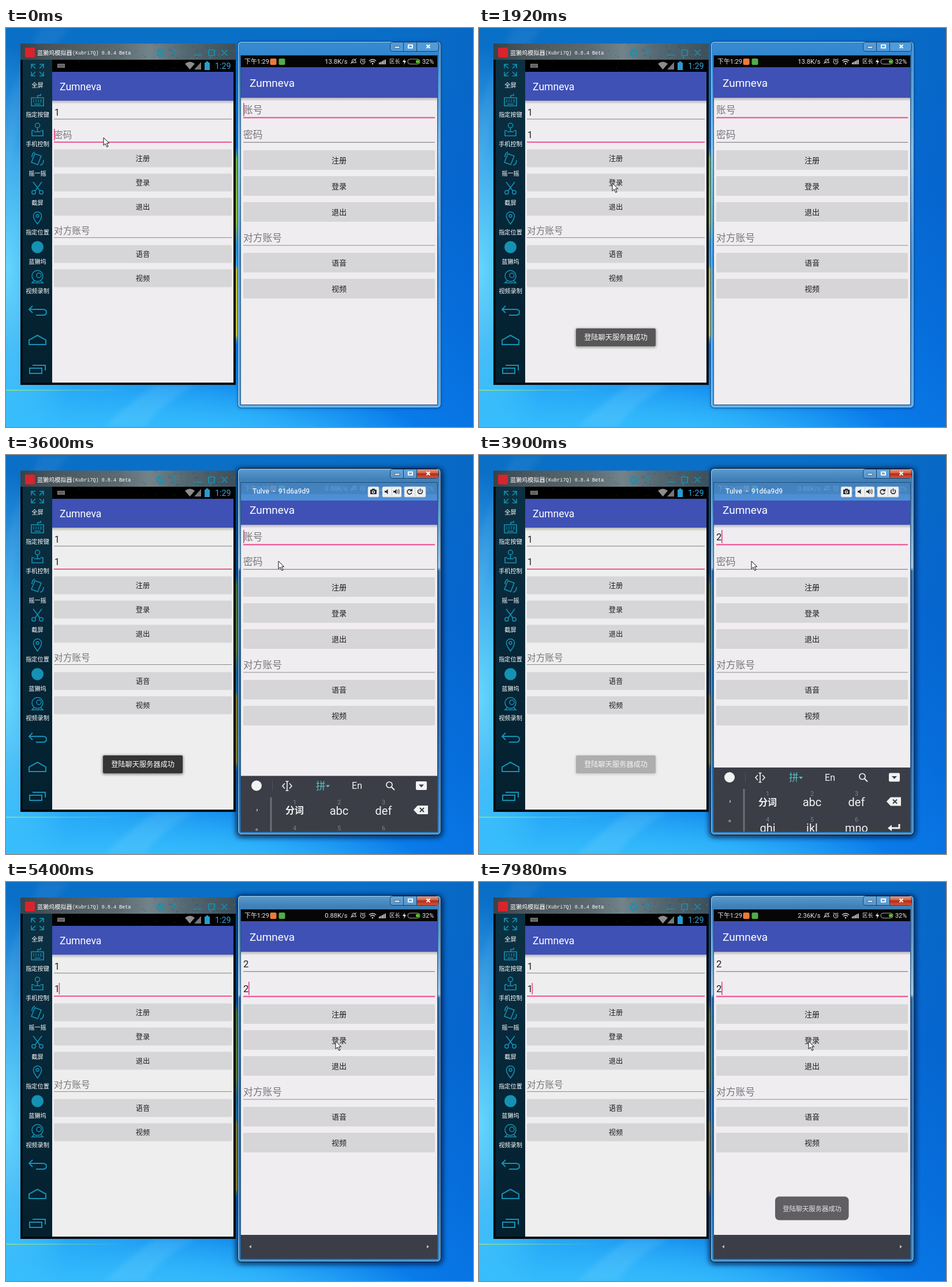
These frames come from a looping animation (809 px wide and 692 px high, 8 s). An HTML page:

```html
<!DOCTYPE html>
<html lang="zh">
<head>
<meta charset="utf-8">
<title>Two devices signing in</title>
<style>
html, body { margin: 0; width: 100%; height: 100%; overflow: hidden; background: #0a74d6; }
svg { display: block; width: 100%; height: 100%; }
text { font-family: Roboto, "Noto Sans CJK SC", "Noto Sans CJK", sans-serif; white-space: pre; }
.mono { font-family: "Liberation Mono", monospace; }
</style>
</head>
<body>
<svg id="stage" viewBox="0 0 809 692" xmlns="http://www.w3.org/2000/svg"></svg>
<script>
const LOOP = 8000, PINK = '#f0468a', TEAL = '#1591b4', INK = '#1c1c1e', HINT = '#78767a';
const APP = 'Zumneva', TOAST = '登陆聊天服务器成功';

// ---- markup helpers ----
const rect = (x, y, w, h, fill, more = '') =>
  `<rect x="${x}" y="${y}" width="${w}" height="${h}" fill="${fill}" ${more}/>`;
const path = (d, stroke, width = 1.5, more = '') =>
  `<path d="${d}" fill="none" stroke="${stroke}" stroke-width="${width}" ${more}/>`;
const fill = (d, color, more = '') => `<path d="${d}" fill="${color}" ${more}/>`;
const disc = (x, y, r, color) => `<circle cx="${x}" cy="${y}" r="${r}" fill="${color}"/>`;
const ring = (x, y, r, color, w = 1.5, more = '') =>
  `<circle cx="${x}" cy="${y}" r="${r}" fill="none" stroke="${color}" stroke-width="${w}" ${more}/>`;
const text = (s, x, cy, size, color, anchor = 'start', more = '') =>
  `<text x="${x}" y="${cy + size * 0.365}" font-size="${size}" fill="${color}" text-anchor="${anchor}" ${more}>${s}</text>`;
const mid = (s, x, cy, size, color, more) => text(s, x, cy, size, color, 'middle', more);
const group = (id, body) => `<g id="${id}">${body}</g>`;
const stops = list => list.map(([o, c, a = 1]) =>
  `<stop offset="${o}" stop-color="${c}" stop-opacity="${a}"/>`).join('');
const linear = (id, x2, y2, list) =>
  `<linearGradient id="${id}" x1="0" y1="0" x2="${x2}" y2="${y2}">${stops(list)}</linearGradient>`;
const radial = (id, color, alpha) =>
  `<radialGradient id="${id}">${stops([[0, color, alpha], [.5, color, alpha * .6], [1, color, 0]])}</radialGradient>`;
const glow = (x, y, rx, ry, id) => `<ellipse cx="${x}" cy="${y}" rx="${rx}" ry="${ry}" fill="url(#${id})"/>`;

let seed = 7;
const rnd = () => (seed = seed * 16807 % 2147483647) / 2147483647;
const specks = (n, x, y, w, h, color) => Array.from({ length: n }, () =>
  rect((x + rnd() * w).toFixed(1), (y + rnd() * h).toFixed(1), 1 + rnd() * 2 | 0, 1, color,
    `opacity="${(.1 + rnd() * .35).toFixed(2)}"`)).join('');

const defs = `<defs>
${linear('sky', 0, 1, [[0, '#0a70c6'], [.4, '#086cd4'], [.75, '#0876e2'], [1, '#0a80ee']])}
${linear('dusk', 1, 0, [[0, '#0050c0', 0], [.7, '#0050c0', .08], [1, '#0050c0', .25]])}
${radial('cyan', '#6adcff', .95)}${radial('azure', '#3cc6ff', .95)}
${linear('line', 1, 0, [[0, '#9fe87a', .9], [1, '#9fe87a', 0]])}
${linear('flag', 0, 1, [[0, '#3fa9d8', 0], [.06, '#6fbf4a'], [.38, '#9ccc3c'], [.5, '#2f9be0'],
  [.6, '#35b4f0'], [.62, '#c8c83c'], [.95, '#d8cf3a'], [1, '#3fa9d8', 0]])}
${linear('topbar', 1, 0, [[0, '#37434a'], [.15, '#4a565c'], [.45, '#5c6a70'], [.6, '#72838a'], [.75, '#566a74'], [1, '#3c505b']])}
${linear('side', 0, 1, [[0, '#0c3142'], [.4, '#07283a'], [1, '#04202e']])}
${linear('drop', 0, 1, [[0, '#000', .24], [1, '#000', 0]])}
${linear('idle', 0, 1, [[0, '#3e93d8'], [.04, '#3a8fd8'], [.3, '#8fcdf2'], [.6, '#3f94e4'], [1, '#5fb4f4']])}
${linear('live', 0, 1, [[0, '#6aaee0'], [.03, '#4a90cc'], [.1, '#5a9fd6'], [.27, '#b4def4'], [.28, '#2a6fb4'], [.7, '#2468b2'], [1, '#3f96da']])}
${linear('red', 0, 1, [[0, '#e09a88'], [.45, '#cf5a44'], [.5, '#b42a14'], [1, '#d4573c']])}
${linear('bar', 0, 1, [[0, '#4a92d6'], [1, '#5298da']])}
<filter id="blur" x="-20%" y="-20%" width="140%" height="140%"><feGaussianBlur stdDeviation="5"/></filter>
<filter id="soft" x="-20%" y="-60%" width="140%" height="220%"><feGaussianBlur stdDeviation="2"/></filter>
<clipPath id="phone"><rect x="407" y="48" width="340" height="605"/></clipPath>
</defs>`;

const wallpaper = rect(0, 0, 809, 692, 'url(#sky)') + rect(400, 0, 409, 692, 'url(#dusk)')
  + glow(0, 420, 130, 390, 'cyan') + glow(90, 720, 420, 210, 'azure') + glow(400, 730, 330, 120, 'azure')
  + fill('M0 150Q14 90 60 0H110Q30 90 0 260Z', '#fff', 'opacity=".05" filter="url(#blur)"')
  + fill('M170 692Q215 650 260 618H330Q270 650 240 692Z', '#bdf0ff', 'opacity=".12" filter="url(#blur)"')
  + rect(0, 627.5, 210, 1.5, 'url(#line)') + rect(397, 205, 9, 345, 'url(#flag)');

// ---- form shared by both devices ----
const button = (x, y, w, h, label, size) =>
  rect(x, y, w, h, '#d6d5d8', 'rx="2"') + mid(label, x + w / 2, y + h / 2 + .5, size, INK);

function form(p) {
  const labels = ['注册', '登录', '退出', '语音', '视频'];
  return rect(p.left, p.top, p.width, p.barH, '#3f51b5')
    + rect(p.left, p.top + p.barH, p.width, 6, 'url(#drop)')
    + text(APP, p.titleX, p.titleY, p.titleSize, '#fff')
    + p.rows.map((y, i) => button(p.x, y, p.w, p.h, labels[i], p.size)).join('')
    + text('对方账号', p.x, p.peerY, p.hint, HINT)
    + rect(p.x, p.peerLine, p.w, 1, '#8b898d');
}

// ---- left emulator ----
function sideIcons() {
  const s = d => path(d, TEAL, 1.6);
  return s('M44 70V63h7M44 63l7 7M58 63h7v7M65 63l-7 7M44 76v7h7M44 83l7-7M65 76v7h-7M65 83l-7-7')
    + s('M44 121h21v14H44zM55 121v-4h5v-3M47 125h2M51 125h2M55 125h2M59 125h3M47 128h2M51 128h2M55 128h2M59 128h3M49 132h11')
    + ring(54.5, 169, 4, TEAL) + s('M54.5 173v7M49 178h-4v9h19v-9h-4M49 180h11')
    + s('M50 218l11 4-6 15-11-4zM45 224q0-7 5-9M65 229q0 8-6 9')
    + s('M47 267l12 16M62 267l-12 16') + ring(48, 285, 3.2, TEAL) + ring(61, 285, 3.2, TEAL)
    + s('M54.5 340q-7-9-7-14a7 7 0 0 1 14 0q0 5-7 14z') + ring(54.5, 326, 2.4, TEAL)
    + disc(54.5, 380, 10.5, TEAL)
    + ring(54.5, 430, 9.5, TEAL) + ring(57, 429, 4, TEAL) + s('M49 438l-4 4h19l-4-4')
    + path('M46 482l-6 6 6 6M40 488h24q6 0 6 5t-6 5H52', TEAL, 2)
    + path('M40 549v-8l14.5-8 14.5 8v8z', TEAL, 2)
    + path('M41 590h21v9H41zM46 585h22v9', TEAL, 2);
}

function emulator() {
  const names = ['全屏', '指定按键', '手机控制', '摇一摇', '截屏', '指定位置', '蓝獭坞', '视频录制'];
  return rect(25, 27, 373, 592, '#05090c')
    + rect(25, 27, 373, 28, 'url(#topbar)') + specks(60, 26, 28, 370, 26, '#9fb4bd') + specks(60, 26, 28, 370, 26, '#0c1a22')
    + rect(33, 34, 17, 17, '#d8242c', 'rx="2"')
    + text('蓝獭坞模拟器', 54, 43, 10.1, '#fff')
    + text('(Kubri7Q) 0.8.4 Beta', 115, 43, 8.45, '#fff', 'start', 'class="mono" xml:space="preserve"')
    + ring(268, 43, 5, TEAL, 2) + ring(268, 43, 7, TEAL, 1.5, 'stroke-dasharray="2.7 2.8"') + disc(268, 43, 1.5, TEAL)
    + mid('?', 291.5, 43, 15, TEAL, 'font-weight="700"')
    + path('M325 47h14M351 38h10v10h-10zM373.5 38l10 10M383.5 38l-10 10', TEAL, 1.7)
    + rect(29, 55, 51, 560, 'url(#side)') + specks(80, 30, 56, 48, 555, '#1b4c5e')
    + sideIcons() + names.map((n, i) => mid(n, 54.5, 99 + i * 51.1, 10.2, '#fff')).join('')
    + group('leftBg', rect(80, 55, 314, 560, '#efedf0'))
    + rect(80, 55, 314, 21, '#000') + specks(30, 110, 56, 190, 19, '#3c4046')
    + rect(89, 62, 13, 7, '#777') + path('M91 64.5h9M92 67h7', '#111', 1, 'stroke-dasharray="1 1"')
    + fill('M310 62q8.5-7 17 0L318.5 72z', '#8c8c8c') + fill('M338 59v13h-12z', '#777')
    + rect(344, 60, 9, 13, '#2a9bd0') + rect(346.5, 58, 4, 2, '#2a9bd0')
    + text('1:29', 362, 66, 14.3, '#33a5dc')
    + form({ left: 80, top: 76, width: 314, barH: 50, titleX: 93, titleY: 102, titleSize: 17.6,
        x: 83, w: 308, h: 31, size: 12.2, rows: [210.5, 252.5, 294.5, 376.5, 418.5], hint: 15.7, peerY: 351, peerLine: 363 })
    + text('1', 84, 146, 15.7, INK) + rect(83, 157.5, 308, 1, '#7f7d81')
    + group('leftHint', text('密码', 83, 185.5, 15.7, HINT)) + group('leftPass', text('1', 84, 185.5, 15.7, INK))
    + rect(83, 197, 308, 1.8, PINK)
    + `<rect id="leftCaret" y="175" width="1.6" height="20" fill="${PINK}"/>`
    + group('leftToast', rect(167, 521, 140, 33, '#000', 'rx="3" opacity=".45" filter="url(#soft)"')
      + rect(168, 521, 138, 31, '#343434', 'rx="2"') + mid(TOAST, 237, 537, 12.2, '#fff'));
}

// ---- right phone window ----
const shell = (paint, edge, close) => rect(401.5, 23.5, 351.5, 635, `url(#${paint})`, `rx="6" stroke="${edge}" fill-opacity=".86"`)
  + rect(402.5, 24.5, 349.5, 633, 'none', 'rx="5" stroke="#d4efff" stroke-opacity=".7"')
  + rect(406.5, 47.5, 341, 606, 'none', 'stroke="#1c4a78"')
  + rect(665.5, 24.5, 84, 16, '#6fb2e6', `fill-opacity=".45" rx="4" stroke="#17406c"`) + close
  + path('M688.5 25v15M711.5 25v15', '#17406c', 1)
  + rect(673, 32, 9, 3, '#fff', 'stroke="#3a4a5c" stroke-width=".8"')
  + rect(697, 29.5, 7, 5, 'none', 'stroke="#fff" stroke-width="2"')
  + path('M728.5 29l6 6M734.5 29l-6 6', '#fff', 2);

const status = () => rect(407, 48, 340, 20, '#050505')
  + text('下午1:29', 413, 58, 10.9, '#e8e8e8')
  + rect(457.5, 53, 11, 11, '#ee7a35', 'rx="2"') + rect(472.5, 53, 11, 11, '#4fae48', 'rx="2"')
  + `<text id="speed" x="591.5" y="62" font-size="11.2" fill="#e8e8e8" text-anchor="end"></text>`
  + path('M598 60q2-1 2-5 2-2 5 0 0 4 2 5zM597 62l10-9', '#ddd', 1)
  + ring(618, 58.5, 3.8, '#ddd', 1.1) + path('M618 56v3h2M613.5 55l2-2M622.5 55l-2-2', '#ddd', 1)
  + path('M629 57q6-5 12 0M631 59.5q4-3.5 8 0', '#ddd', 1.4) + disc(635, 62, 1.3, '#ddd')
  + [0, 1, 2, 3, 4].map(i => rect(646 + i * 2.5, 60 - i * 1.3, 1.7, 3 + i * 1.3, '#ddd')).join('')
  + text('区长', 664, 58, 9.4, '#e8e8e8')
  + fill('M691 53l-4 6h3l-1 5 4-7h-3z', '#eee')
  + rect(696, 54, 21, 8.5, 'none', 'rx="4" stroke="#aaa"') + rect(710, 55.5, 6, 5.5, '#58c322', 'rx="2"')
  + text('32%', 721, 58, 10.9, '#e8e8e8');

function keyboard() {
  const W = '#f2f2f4', G = '#7d808a', D = '#3b3e47';
  const keys = [['分词', 'abc', 'def'], ['ghi', 'jkl', 'mno']];
  return rect(407, 542, 340, 220, D)
    + disc(434, 559, 9, W) + rect(461, 550, 1, 18, '#50535d')
    + path('M487 552v15M484.5 551.5h5M484.5 567.5h5M483 555l-4 4.5 4 4.5M491 555l4 4.5-4 4.5', W, 1.6)
    + text('拼', 537, 559, 16.5, '#56c4ca') + fill('M554 558h7l-3.5 4z', '#56c4ca')
    + mid('En', 608, 559, 16, W) + ring(664, 557.5, 5, W, 1.7) + path('M668 561.5l5 5', W, 2)
    + rect(710, 551.5, 19, 15, W, 'rx="2"') + fill('M715 557h9l-4.5 5z', D)
    + rect(457.5, 579, 3, 90, '#6b6e78')
    + mid('，', 438, 598, 12, W) + mid('。', 438, 632, 12, W)
    + keys.map((row, r) => row.map((k, i) => {
        const x = 500 + i * 77;
        return mid(r * 3 + i + 1, x, 587 + r * 45, 11, G)
          + mid(k, x, 602 + r * 45, k === '分词' ? 16 : 20, W, k === '分词' ? 'font-weight="700"' : '');
      }).join('')).join('')
    + fill('M706 601l7-7.5h18v15h-18z', W) + path('M717 597.5l7 7M724 597.5l-7 7', D, 2)
    + path('M728 640v7H712', W, 3) + fill('M708 647l7-5.5v11z', W);
}

const overlay = () => {
  const K = '#2c2c30', box = (x, w) => rect(x, 55, w, 18, '#eef0f2', 'rx="2" stroke="#b8c4d0" stroke-width=".6"');
  const horn = x => fill(`M${x} 62h2.5l3-3v9l-3-3H${x}z`, K);
  return rect(407, 48, 340, 31, 'url(#bar)', 'opacity=".88"')
    + text('Tulve  -  91d6a9d9', 427, 63, 12, '#e6f0fa', 'start', 'font-weight="500" xml:space="preserve"')
    + box(627, 19) + box(652, 33) + box(690, 37) + path('M668.5 56v16M708.5 56v16', '#c4ccd4', 1)
    + rect(631, 60, 11, 8, K, 'rx="1"') + rect(634, 58.5, 5, 2, K) + ring(636.5, 64, 2, '#fff', 1.2)
    + horn(656) + horn(671) + path('M678 60.5q2 3 0 6M680 59q3 4.5 0 9', K, 1)
    + path('M702 61a4 4 0 1 0 1 4', K, 1.6) + fill('M704 58v5h-5z', K)
    + path('M715 60a4 4 0 1 0 5 0M717.5 58v5.5', K, 1.6);
};

function phone() {
  const close = rect(712, 25, 37, 15, 'url(#red)', 'rx="3"');
  return group('idle', rect(401, 23, 353, 637, '#00265a', 'rx="6" opacity=".35" filter="url(#soft)"') + shell('idle', '#1b4d80', ''))
    + group('live', rect(399, 23, 357, 640, '#00102c', 'rx="8" opacity=".8" filter="url(#blur)"')
      + shell('live', '#0a1c34', close))
    + `<g clip-path="url(#phone)">` + rect(407, 48, 340, 605, '#f0edf1') + status()
    + form({ left: 407, top: 68, width: 340, barH: 53, titleX: 422, titleY: 95, titleSize: 19,
        x: 411, w: 332, h: 34, size: 13, rows: [212, 257, 302, 390, 435], hint: 16.8, peerY: 363.5, peerLine: 376.5 })
    + group('userHint', text('账号', 411, 142, 16.8, HINT)) + group('user', text('2', 411, 142, 16.8, INK))
    + group('passHint', text('密码', 411, 185, 16.8, HINT)) + group('pass', text('2', 411, 185, 16.8, INK))
    + `<rect id="userLine" x="411" width="332"/><rect id="passLine" x="411" width="332"/>`
    + `<rect id="caret" width="1.7" height="23" fill="${PINK}"/>`
    + group('toast', rect(513, 545.5, 127.5, 41, '#605e62', 'rx="7"') + mid(TOAST, 577, 566.5, 11.3, '#e4e2e5'))
    + group('keys', keyboard())
    + group('strip', rect(407, 612, 340, 41, '#3b3e47') + fill('M425 629.5v6l-4-3z', '#b9bbc2') + fill('M729 629.5v6l4-3z', '#b9bbc2'))
    + group('overlay', overlay()) + '</g>';
}

const pointer = fill('M0 0V13.5L3.2 10.6 5.7 16.3 8 15.3 5.5 9.8H9.7Z', '#fff', 'stroke="#111" stroke-width="1" id="pointer"');

document.getElementById('stage').innerHTML = defs + wallpaper + phone() + emulator() + pointer;

// ---- motion ----
const el = {};
document.querySelectorAll('[id]').forEach(n => el[n.id] = n);
const set = (id, props) => { for (const k in props) el[id].setAttribute(k, props[k]); };
const alpha = (id, v) => set(id, { opacity: +v });

function track(t, keys) {
  const i = keys.findIndex(k => k[0] > t);
  if (i < 0) return keys[keys.length - 1][1];
  if (!i) return keys[0][1];
  const [a, u] = keys[i - 1], [b, v] = keys[i];
  return u + (v - u) * (t - a) / (b - a);
}

const MOUSE_X = [[300, 169], [840, 231], [2640, 231], [3000, 436], [3300, 436], [3600, 472], [4650, 472], [5100, 571]];
const MOUSE_Y = [[300, 190], [840, 269], [2640, 269], [3000, 148], [3300, 148], [3600, 184], [4650, 184], [5100, 276]];

function underline(id, y, focused) {
  set(id, focused ? { y: y - .5, height: 2, fill: PINK } : { y: y - .3, height: 1.3, fill: '#8b898d' });
}

function draw(t) {
  const step = Math.floor(t / 150) * 150;
  const blink = (t + 20) % 1000 < 520;
  const typed = t >= 270, live = t >= 3180, user = t >= 3750, onPass = t >= 4300, pass = t >= 4560;

  set('pointer', { transform: `translate(${track(step, MOUSE_X)} ${track(step, MOUSE_Y)})` });

  alpha('leftHint', !typed);
  alpha('leftPass', typed);
  set('leftCaret', { x: typed ? 91.5 : 83 });
  alpha('leftCaret', blink);
  el.leftBg.firstChild.setAttribute('fill', t < 2640 ? '#efedf0' : '#eeeeee');
  alpha('leftToast', track(t, [[1680, 0], [1690, .3], [1950, .87], [2370, 1], [3700, 1], [3900, .34], [4030, 0]]));

  alpha('idle', !live);
  alpha('live', live);
  el.speed.textContent = t < 2910 ? '13.8K/s' : t < 7590 ? '0.88K/s' : '2.36K/s';
  alpha('userHint', !user);
  alpha('user', user);
  alpha('passHint', !pass);
  alpha('pass', pass);
  underline('userLine', 155, !onPass);
  underline('passLine', 198, onPass);
  set('caret', { x: (onPass ? pass : user) ? 420 : 411, y: onPass ? 173 : 130 });
  alpha('caret', blink || (t >= 3300 && t < 4800));

  alpha('keys', t >= 3330 && t < 4020);
  set('keys', { transform: `translate(0 ${track(step, [[3300, 111], [3450, 48], [3600, 14.5], [3750, 4], [3900, 0]])})` });
  alpha('strip', t >= 4020);
  alpha('overlay', track(t, [[2900, 0], [3060, 1], [4830, 1], [5250, 0]]));
  alpha('toast', track(t, [[7650, 0], [7950, 1]]));
}

function tick(now) {
  draw(now % LOOP);
  requestAnimationFrame(tick);
}
draw(0);
requestAnimationFrame(tick);
</script>
</body>
</html>
```
